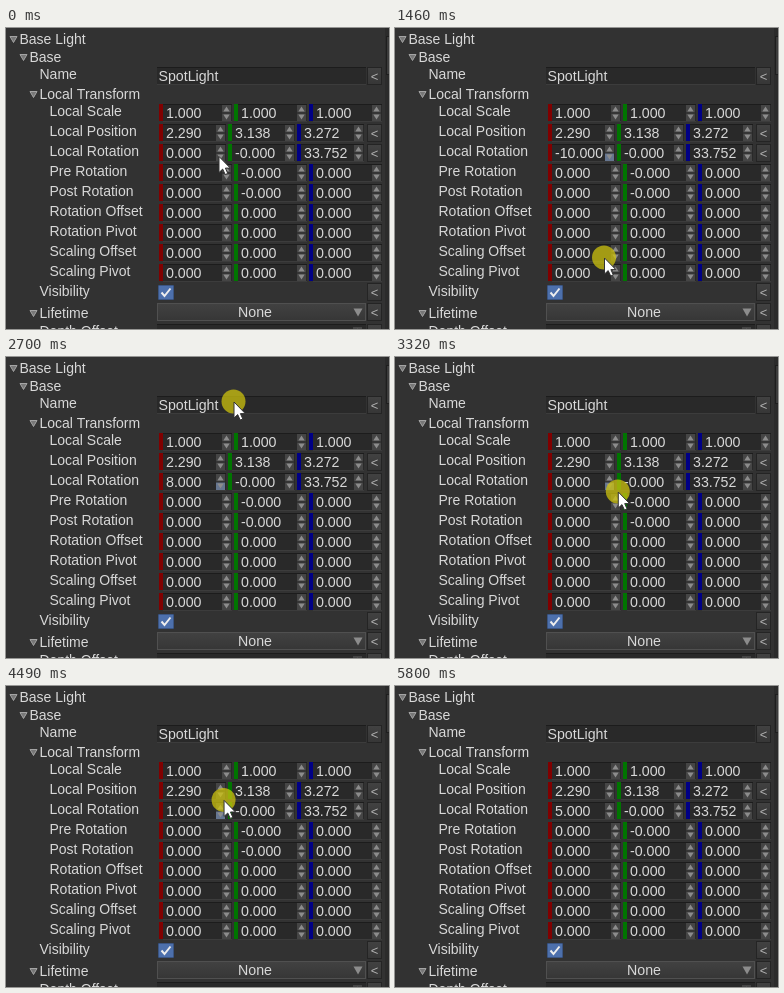
Recreate the animation shown at these times as an HTML page with a canvas. Size 383 by 301 pixels, loop 6180 ms.

```html
<!DOCTYPE html>
<html lang="en">
<head>
<meta charset="utf-8">
<title>Light inspector</title>
<style>
  html, body { margin: 0; width: 100%; height: 100%; overflow: hidden; background: #323232; }
  canvas { display: block; }
</style>
</head>
<body>
<canvas id="stage" width="383" height="301"></canvas>
<script>
const ctx = document.getElementById('stage').getContext('2d');
const LOOP = 6180, STEP = 77.5;
const PRESS = 530, RELEASE = 5180, GONE = 5800;
const START = { x: 213, y: 128.5 };

// Mouse moves, shown in steps; power > 1 speeds up, power < 1 slows down
const moves = [
  { from: PRESS, to: 1460, x: 209.5, y: 230, power: 1.95 },
  { from: 1760, to: 2700, x: 228, y: 45, power: 0.62 },
  { from: 3020, to: 3780, x: 219, y: 217, power: 0.64 },
  { from: 4030, to: 4870, x: 217.5, y: 53, power: 0.87 },
  { from: 5020, to: RELEASE, x: 215.5, y: 70, power: 1 },
  { from: 5410, to: GONE, x: 356, y: 325, power: 1.2 },
];

function cursorAt(t) {
  let { x, y } = START;
  for (const move of moves) {
    if (t < move.from) break;
    const span = move.to - move.from;
    const gaps = Math.round(span / STEP);
    const done = Math.min(gaps, Math.floor((t - move.from) / span * gaps + 0.01));
    const p = ((done + 1) / (gaps + 1)) ** move.power;
    x += (move.x - x) * p;
    y += (move.y - y) * p;
  }
  return { x, y };
}

function rect(x, y, w, h, fill) {
  ctx.fillStyle = fill;
  ctx.fillRect(x, y, w, h);
}

function polygon(points, fill, stroke) {
  ctx.beginPath();
  points.forEach(([x, y]) => ctx.lineTo(x, y));
  ctx.closePath();
  ctx.fillStyle = fill;
  ctx.fill();
  if (stroke) {
    ctx.strokeStyle = stroke;
    ctx.lineWidth = 1;
    ctx.stroke();
  }
}

function text(str, x, baseline, size = 14, align = 'left', color = '#d8d8d8') {
  ctx.font = `${size}px "Liberation Sans", Arial, sans-serif`;
  ctx.textAlign = align;
  ctx.fillStyle = color;
  ctx.fillText(str, x, baseline);
}

// Triangle centred on (x, y); a negative height points up
function arrow(x, y, halfWidth, height, fill, stroke) {
  polygon([[x - halfWidth, y - height / 2], [x + halfWidth, y - height / 2], [x, y + height / 2]], fill, stroke);
}

function foldout(label, x, y) {
  arrow(x - 6, y, 3.5, 6, '#777', '#a4a4a4');
  text(label, x, y + 4.5);
}

function box(x, y, w, h) {
  rect(x, y, w, h, '#292929');
  rect(x, y, w, 1, '#1c1c1c');
  rect(x, y + h - 1, w, 1, '#3c3c3c');
}

function button(x, y, w, h, border) {
  rect(x, y, w, h, border);
  const shade = ctx.createLinearGradient(0, y, 0, y + h);
  shade.addColorStop(0, '#424242');
  shade.addColorStop(1, '#363636');
  rect(x + 1, y + 1, w - 2, h - 2, shade);
}

function resetButton(y) {
  button(361, y - 9, 15, 18, '#242424');
  text('<', 368.5, y + 4.5, 13, 'center', '#b4b4b4');
}

function spinner(x, y, pressed) {
  const lower = pressed ? '#667690' : '#454545';
  rect(x, y - 8, 9, 16, '#262626');
  rect(x, y - 8, 9, 7.5, '#454545');
  rect(x, y + 0.5, 9, 7.5, lower);
  arrow(x + 4.5, y - 4, 3.2, -5, '#8c8c8c');
  arrow(x + 4.5, y + 4, 3.2, 5, '#8c8c8c');
}

function vectorRow(label, y, values, narrow, pressed) {
  const pitch = narrow ? 69 : 75;
  text(label, 43.5, y + 3);
  values.forEach((value, i) => {
    const left = 152 + i * pitch;
    box(left + 5, y - 9, pitch - 6, 18);
    rect(left + 1, y - 9, 4, 17, ['#800000', '#007500', '#000085'][i]);
    text(value, left + 8, y + 5, 14.2);
    spinner(left + pitch - 11, y, pressed && i === 0);
  });
  if (narrow) resetButton(y);
}

function drawCheckbox(x, y) {
  rect(x, y, 16, 15, '#2a3a58');
  rect(x + 0.5, y + 0.5, 15, 14, '#4d70ac');
  ctx.beginPath();
  ctx.moveTo(x + 3.5, y + 7.5);
  ctx.lineTo(x + 6.5, y + 11);
  ctx.lineTo(x + 12.5, y + 3.5);
  ctx.strokeStyle = '#eee';
  ctx.lineWidth = 2;
  ctx.stroke();
}

function drawPanel(angle, pressed) {
  rect(0, 0, 383, 301, '#323232');
  rect(379, 0, 4, 301, '#2b2b2b');
  rect(380, 8, 3, 39, '#1e1e1e');
  rect(381, 9, 2, 37, '#3c3c3c');

  foldout('Base Light', 13.5, 11.5);
  foldout('Base', 23.5, 29.5);
  text('Name', 33.5, 51);
  box(151, 39, 209, 18);
  text('SpotLight', 152.5, 53, 14.2);
  resetButton(48);

  foldout('Local Transform', 33.5, 66.5);
  const zero = '0.000', one = '1.000';
  vectorRow('Local Scale', 85, [one, one, one]);
  vectorRow('Local Position', 105, ['2.290', '3.138', '3.272'], true);
  vectorRow('Local Rotation', 125, [angle.toFixed(3), '-0.000', '33.752'], true, pressed);
  ['Pre Rotation', 'Post Rotation', 'Rotation Offset', 'Rotation Pivot', 'Scaling Offset', 'Scaling Pivot']
    .forEach((label, i) => vectorRow(label, 145 + 20 * i, [zero, i < 2 ? '-0.000' : zero, zero]));

  text('Visibility', 33.5, 268);
  drawCheckbox(152, 257);
  resetButton(264);

  foldout('Lifetime', 33.5, 285.5);
  button(151, 275, 209, 18, '#505050');
  text('None', 249, 289, 14.2, 'center');
  arrow(352, 284.5, 4.5, 8, '#8c8c8c');
  resetButton(284);

  text('Depth Offset', 33.5, 308);
  box(151, 296, 209, 18);
  spinner(347, 307);
  resetButton(305);
}

function drawCursor({ x, y }, pressed) {
  if (pressed) {
    ctx.beginPath();
    ctx.arc(x - 0.5, y - 0.5, 12, 0, 2 * Math.PI);
    ctx.fillStyle = 'rgba(206, 195, 14, 0.74)';
    ctx.fill();
  }
  const shape = [[0, 0], [0, 16], [3.7, 12.6], [6.2, 18], [8.8, 17], [6.4, 11.6], [11.3, 11.6]];
  polygon(shape.map(([dx, dy]) => [x + dx, y + dy]), '#fff', '#333');
}

function draw(now) {
  const t = now % LOOP;
  const cursor = cursorAt(t);
  const pressed = t >= PRESS && t < RELEASE;
  // One degree for every ten pixels of drag
  const dragY = cursorAt(Math.min(t, RELEASE)).y;
  drawPanel(Math.trunc((129 - dragY) / 10) || 0, pressed);
  if (t < GONE) drawCursor(cursor, pressed);
}

let begin;
function loop(now) {
  begin ??= now;
  draw(now - begin);
  requestAnimationFrame(loop);
}
requestAnimationFrame(loop);
</script>
</body>
</html>
```
